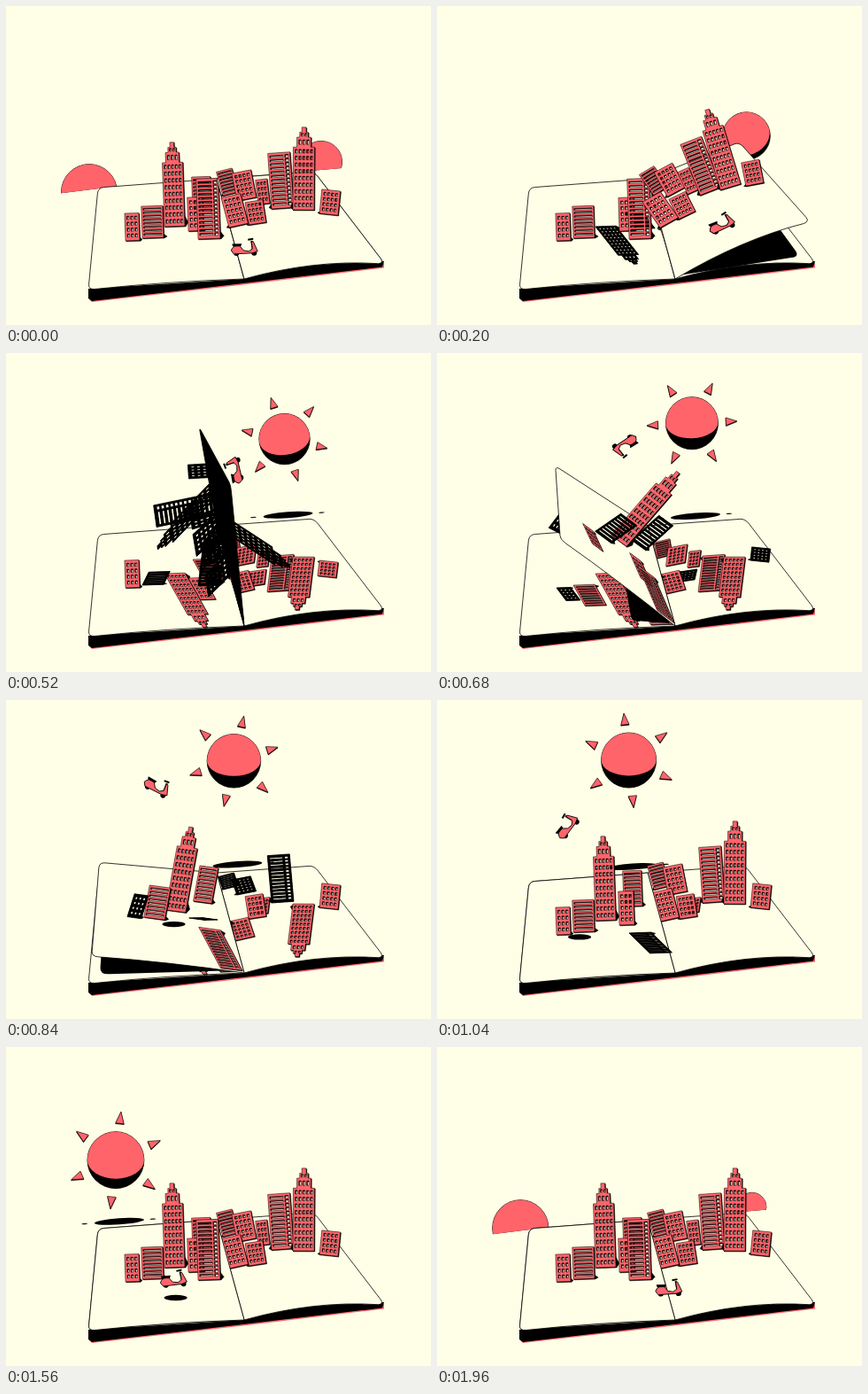
Write an HTML page that moves like this. It is 480 px wide and 360 px high and loops after 2 s.

```html
<!DOCTYPE html>
<html lang="en">
<head>
<meta charset="utf-8">
<title>Pop-up city</title>
<style>
html, body { margin: 0; width: 100%; height: 100%; overflow: hidden; background: #fffee6; }
svg { display: block; width: 100vw; height: 100vh; }
path, ellipse, circle { stroke-linejoin: round; vector-effect: non-scaling-stroke; }
</style>
</head>
<body>
<svg id="stage" viewBox="0 0 480 360">
  <clipPath id="sky"><path d="M0 0H480V168L379 183 240 195 125 203.5 0 219Z"/></clipPath>
</svg>
<script>
const PAPER = '#fffee6', RED = '#ff646a', INK = '#000', LOOP = 2000;
const stage = document.getElementById('stage');

const make = (tag, parent, attrs = {}) => {
  const el = document.createElementNS('http://www.w3.org/2000/svg', tag);
  parent.appendChild(el);
  return set(el, attrs);
};
function set(el, attrs) {
  for (const k in attrs) el.setAttribute(k, attrs[k]);
  return el;
}
const show = (el, on) => set(el, { visibility: on ? 'visible' : 'hidden' });
const clamp = p => Math.min(1, Math.max(0, p));
const smooth = p => (p = clamp(p), p * p * (3 - 2 * p));
const mix = (p, q, k) => [p[0] + (q[0] - p[0]) * k, p[1] + (q[1] - p[1]) * k];
const rad = d => d * Math.PI / 180;

// Smooth curve through a few [time, ...values]
const track = keys => t => {
  const last = keys.length - 1;
  let i = 0;
  while (i < last - 1 && t > keys[i + 1][0]) i++;
  const slope = (j, c) => {
    const p = keys[Math.max(0, j - 1)], q = keys[Math.min(last, j + 1)];
    return (q[c] - p[c]) / (q[0] - p[0]);
  };
  const p = keys[i], q = keys[i + 1], d = q[0] - p[0], u = (t - p[0]) / d;
  return p.slice(1).map((v, n) => {
    const c = n + 1;
    return v + (q[c] - v) * smooth(u) + d * u * (1 - u) * ((1 - u) * slope(i, c) - u * slope(i + 1, c));
  });
};

// Book space: a = distance from spine, b = depth towards viewer, z = off the page
const spine = [[238, 195], [269, 308]];
const rightAxis = [[110, -8], [158, -18]];
const leftAxis = [[-134, 10], [-176, 12]];
const upAxis = [[-6, -113], [3, -161]];
const at = (axis, b) => mix(axis[0], axis[1], b);

function place(side, lift, a, b, z = 0) {
  const c = Math.cos(lift), s = Math.sin(lift);
  const x = side * (a * c - z * s), h = a * s + z * c;
  const o = at(spine, b), w = at(x > 0 ? rightAxis : leftAxis, b), u = at(upAxis, b);
  return [0, 1].map(i => o[i] + Math.abs(x) * w[i] + h * u[i]);
}
function locate(side, x, y) {
  const axis = side > 0 ? rightAxis : leftAxis;
  let a = 0, b = 0.5;
  for (let i = 0; i < 12; i++) {
    const w = at(axis, b);
    a = (x - spine[0][0] - b * 31) / w[0];
    b = (y - spine[0][1] - a * w[1]) / 113;
  }
  return [a, b];
}

// Facades live in a unit square with y up
function grid(cols, rows, x0, x1, y0, y1, fillX = 0.55, fillY = 0.55) {
  let d = '';
  const w = (x1 - x0) / cols, h = (y1 - y0) / rows;
  for (let r = 0; r < rows; r++)
    for (let c = 0; c < cols; c++)
      d += `M${x0 + w * (c + (1 - fillX) / 2)} ${y0 + h * (r + (1 - fillY) / 2)}h${w * fillX}v${h * fillY}h${-w * fillX}z`;
  return d;
}
const box = 'M0 0H1V1H0Z';
const kinds = {
  grid: (w, h) => box + grid(Math.round(w / 5), Math.round(h / 7), 0.08, 0.92, 0.08, 0.94),
  slats: (w, h) => box + grid(1, Math.round(h / 4.3), 0.08, 0.92, 0.05, 0.96, 1, 0.5),
  tall: (w, h) => box + grid(1, Math.round(h / 4.8), 0.08, 0.68, 0.04, 0.97, 1, 0.5) +
    grid(1, Math.round(h / 4.8), 0.76, 0.92, 0.04, 0.97, 1, 0.7),
  tower: () => 'M0 0H1V.76H.83V.88H.7V.94H.6V1H.4V.94H.3V.88H.17V.76H0Z' +
    grid(5, 9, 0.05, 0.95, 0.02, 0.75) + grid(3, 1, 0.22, 0.78, 0.77, 0.87) + grid(2, 1, 0.33, 0.67, 0.88, 0.94)
};

// kind, x, y, width, height, moment of rising
const leftCity = [
  ['slats', 211, 233, 21, 40, 520],
  ['tower', 179, 249, 23, 95, 440],
  ['grid', 206, 254, 17, 38, 760],
  ['tall', 217, 263, 25, 68, 990],
  ['slats', 154, 262, 24, 36, 540],
  ['grid', 135, 265, 16, 31, 690]
];
const rightCity = [
  ['slats', 245, 214, 18, 28, 720],
  ['grid', 261, 220, 22, 32, 720],
  ['grid', 285, 224, 13, 28, 1020],
  ['tall', 300, 229, 25, 63, 690],
  ['tower', 324, 230, 24, 93, 840],
  ['grid', 274, 247, 20, 26, 640],
  ['grid', 252, 250, 22, 35, 860],
  ['grid', 354, 234, 21, 27, 560]
];

function building([kind, x, y, w, h, rise], side, parent) {
  const right = side > 0;
  const tilt = rad(right ? 14 - (x - 245) / 5.5 : 2);
  const fall = right ? (kind === 'tower' ? 420 : 400 + 2 * (x - 240)) : 40 + 30 * Math.max(0, y - 249);
  const foot = locate(side, x, y), end = locate(side, x + w * Math.cos(tilt), y - w * Math.sin(tilt));
  const flat = locate(side, x + h * (right ? -0.08 : 0.36), y + h * 0.64);
  flat[0] = Math.max(0, flat[0]);
  const up = at(upAxis, foot[1]), height = -h * Math.cos(tilt) / up[1];
  const lean = (-h * Math.sin(tilt) - height * up[0]) / at(right ? rightAxis : leftAxis, foot[1])[0];
  const d = kinds[kind](w, h);
  const sliver = right ? 'M0 0L-.14.04 0 .12Z' : 'M1 0L1.14.05 1 .12Z';
  const paint = { 'fill-rule': 'evenodd', stroke: INK, 'stroke-width': 0.5 };
  const back = make('path', parent, { ...paint, d: d + sliver, fill: INK });
  const front = make('path', parent, { ...paint, d });
  return (t, rising, lift) => {
    const p = smooth((t - (rising ? rise : fall)) / 200);
    const fold = Math.PI / 2 * (rising ? 1 - p : p), s = Math.sin(fold), c = Math.cos(fold);
    const o = place(side, lift, ...foot), e = place(side, lift, ...end);
    const top = place(side, lift, foot[0] + (flat[0] - foot[0]) * s + lean * c,
      foot[1] + (flat[1] - foot[1]) * s, height * c);
    const m = (dx, dy) => `matrix(${[e[0] - o[0], e[1] - o[1], top[0] - o[0], top[1] - o[1], o[0] + dx, o[1] + dy]})`;
    const lit = (fold < 0.1 || fold > 1.46) && lift < 0.87;
    set(front, { transform: m(0, 0), fill: lit ? RED : INK });
    set(back, { transform: lit ? m(0.8, 0.8) : m(0, 0) });
  };
}
function city(specs, side, parent) {
  const el = make('g', parent);
  const parts = specs.map(s => building(s, side, el));
  return { el, update: (...args) => parts.forEach(f => f(...args)) };
}

function pagePath(side, lift, bow) {
  const h0 = spine[0], h1 = spine[1], f = place(side, lift, 1, 0), n = place(side, lift, 1, 1);
  const mid = mix(n, h1, 0.5);
  return `M${h0}L${mix(f, h0, 0.05)}Q${f} ${mix(f, n, 0.06)}L${mix(n, f, 0.05)}Q${n} ${mix(n, h1, 0.04)}Q${mid[0]} ${mid[1] - bow} ${h1}Z`;
}
const sheet = { fill: PAPER, stroke: INK, 'stroke-width': 0.8 };

// The sun crosses the sky on a half ellipse
function sun(parent) {
  const shade = make('path', parent, { fill: INK });
  const clipped = make('g', parent, { 'clip-path': 'url(#sky)' });
  const g = make('g', clipped);
  const rays = Array.from({ length: 6 }, () => [INK, RED].map(fill =>
    make('path', g, { fill, stroke: INK, 'stroke-width': 0.6 })));
  const disc = make('circle', g, { fill: INK, stroke: INK, 'stroke-width': 0.8 });
  const face = make('path', g, { fill: RED });
  return t => {
    const turn = Math.PI * t / LOOP, cos = Math.cos(turn), sin = Math.sin(turn);
    const rise = Math.sign(sin) * Math.abs(sin) ** 1.15;
    const x = 225 + 131 * cos, y = 176 + 0.017 * t - 126 * rise;
    const r = (25.5 + 6.5 * Math.sin(Math.PI * t / 3200)) * smooth((t + 140) / 170);
    const dusk = 0.56 + 0.44 * (1 - Math.max(0, sin)) ** 1.5;
    const reach = smooth((t - 230) / 200) * (1 - smooth((t - 1640) / 200));
    show(g, t > -140 && t < 2300);
    set(g, { transform: `translate(${x} ${y})` });
    set(disc, { r: Math.max(0, r) });
    set(face, {
      d: `M${-r} 0A${r} ${r} 0 0 1 ${r} 0A${r} ${r * dusk} 0 0 1 ${-r} 0Z`,
      transform: `rotate(${-25 * Math.max(0, cos) ** 3})`
    });
    rays.forEach((pair, i) => {
      const angle = 12 - 0.092 * (t - 520) + i * 60;
      const far = r * (0.5 + 1.22 * reach), near = far - r * 0.42 * reach, half = r * 0.15 * reach;
      pair.forEach((ray, top) => set(ray, {
        d: `M${far} 0L${near} ${half}V${-half}Z`,
        transform: `translate(0 ${top ? 0 : 0.8}) rotate(${angle})`,
        display: reach > 0 ? 'inline' : 'none'
      }));
    });
    const w = 28 * reach;
    const oval = (dx, rx, ry) => `M${dx - rx} 0a${rx} ${ry} 0 0 1 ${2 * rx} 0a${rx} ${ry} 0 0 1 ${-2 * rx} 0z`;
    set(shade, {
      d: oval(0, w, w / 8) + oval(-w * 1.4, w / 8, w / 50) + oval(w * 1.36, w / 8, w / 50),
      transform: `translate(${x + 4} ${181 + 26 * (t / LOOP) ** 2}) rotate(-4)`
    });
    show(shade, w > 0.5);
  };
}

// Scooter: x, y, rotation
const ride = track([
  [0, 269, 273, 0], [200, 321, 246, -22], [520, 258, 133, -100], [840, 171, 97, -330],
  [1040, 146, 142, -410], [1560, 189, 262, -724], [2000, 269, 273, -720]
]);

// Scene, back to front
const suns = [sun(stage), sun(stage)];
make('path', stage, { d: 'M94 331L97 334 268 314.5 427 295.5V290L268 308Z', fill: RED });
make('path', stage, { d: 'M93 318V330L97 333 268 313 425 294.5 427 288Q348 285 269 308L93 319Z', fill: INK });
make('path', stage, { ...sheet, d: pagePath(-1, 0, 3) });
make('path', stage, { ...sheet, d: pagePath(1, 0, 13) });
const oldLeft = city(leftCity, -1, stage);
const newRight = city(rightCity, 1, stage);
const pageShade = make('path', stage, { fill: INK });
const turning = make('g', stage);
const newLeft = city(leftCity, -1, turning);
const page = make('path', turning, sheet);
const oldRight = city(rightCity, 1, turning);
const dark = make('ellipse', stage, { fill: INK });
const scooter = make('g', stage);
for (const cx of [-9, 11]) make('circle', scooter, { cx, cy: 6, r: 3, fill: INK });
make('path', scooter, { d: 'M-5 5H10L8-8M4-9L10-10', fill: 'none', stroke: INK, 'stroke-width': 2 });
make('path', scooter, {
  d: 'M-15 3Q-13-3-6-3L-1 3 5 4 9 1 8-7 10-7 15 4 9 6-12 7Z', fill: RED, stroke: INK, 'stroke-width': 0.9
});
make('path', scooter, { d: 'M-14-4.5H-3L-4-1.5H-13Z', fill: INK });

function render(t) {
  suns[0](t);
  suns[1](t < LOOP / 2 ? t + LOOP : t - LOOP);

  const angle = Math.PI * (1 - Math.cos(Math.PI * clamp(t / 1000))) / 2;
  const back = Math.PI - angle, turned = t >= 1000;
  oldLeft.update(t, false, 0);
  newRight.update(t, true, 0);
  oldRight.update(t, false, angle);
  newLeft.update(t, true, back);
  show(oldLeft.el, !turned);
  show(oldRight.el, !turned);
  show(newLeft.el, angle > 0.6);
  show(newRight.el, t > 60);

  const early = angle < rad(98);
  const order = early ? [newLeft.el, page, oldRight.el] : [oldRight.el, page, newLeft.el];
  if (turning.firstChild !== order[0]) order.forEach(el => turning.appendChild(el));
  const side = angle < Math.PI / 2 ? 1 : -1, lift = side > 0 ? angle : back;
  set(page, {
    d: pagePath(side, lift, side > 0 ? 4 + 9 * Math.cos(lift) : 3),
    fill: early && angle > 0.87 ? INK : PAPER
  });

  // Shadow cast on the page below
  const reach = Math.max(0, Math.min(0.93, 1.6 * (1 - lift / rad(50))));
  const corner = (a, b) => place(side, 0, a, b);
  show(pageShade, reach > 0 && lift > 0.01);
  set(pageShade, {
    d: `M${corner(0, 0.1)}L${corner(reach, 0.1)}L${corner(reach, 0.85)}Q${corner(reach, 0.92)} ${corner(reach * 0.93, 0.92)}L${corner(0.03, 0.97)}Z`
  });

  const [x, y, turn] = ride(t);
  set(scooter, { transform: `translate(${x} ${y}) rotate(${turn})` });
  const ground = 283 - 30 * ((1560 - t) / 720) ** 2;
  const size = clamp((t - 720) / 100) * clamp((1760 - t) / 100);
  set(dark, { cx: x + 0.12 * (ground - y), cy: ground, rx: 13 * size, ry: 3.2 * size });
}

const start = performance.now();
function tick(now) {
  render(Math.max(0, now - start) % LOOP);
  requestAnimationFrame(tick);
}
render(0);
requestAnimationFrame(tick);
</script>
</body>
</html>
```
